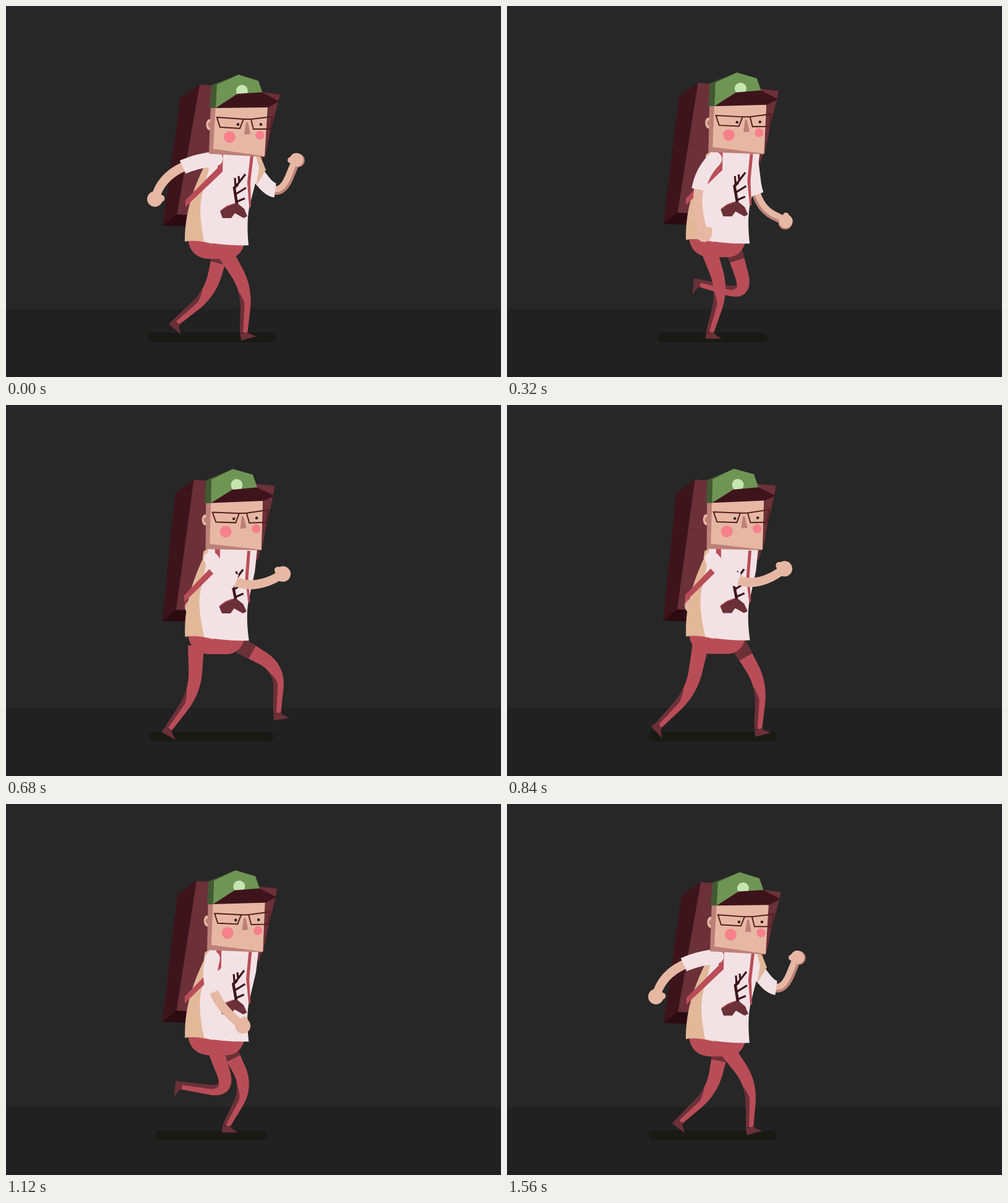
These frames come from a looping animation (800x600 px, 1.6 s). An HTML page with a canvas:

```html
<!DOCTYPE html>
<html lang="en">
<head>
<meta charset="utf-8">
<title>Walking hiker</title>
<style>
  html, body { margin: 0; height: 100%; overflow: hidden; background: #272727; }
  canvas { display: block; }
</style>
</head>
<body>
<canvas id="stage" width="800" height="600"></canvas>
<script>
const ctx = document.getElementById('stage').getContext('2d');
const LOOP = 1600, STEP = 40, SAMPLES = 40, RAD = Math.PI / 180;
const RED = '#b94d57', BROWN = '#6b3038', DARK = '#3e141c', WHITE = '#f3e2e5',
      SKIN = '#e6b8a3', SHADE = '#bc8078', TAN = '#e2b899';

// Heel x, heel y and foot angle at eight even moments of one stride
const stride = [
  [380, 541, -13], [344, 538, 1], [305, 538, 4], [266, 533, 24],
  [235, 521, 44], [240, 508, 72], [306, 420, 101], [405, 494, 9]
];
const nearLeg = { delay: 0, hip: 331, swing: 24, dx: 0, dy: 0 };
const farLeg = { delay: LOOP / 2, hip: 362, swing: 17, dx: 28, dy: -7 };

const wave = (time, period = LOOP) => Math.cos(2 * Math.PI * time / period);

// Quick rise, slower fall, four times per loop
const bobAt = time => 8 * (wave((time % 400 / 400) ** 0.66, 1) - 1);

// Closed Catmull-Rom curve through evenly timed points
function follow(points, time) {
  const n = points.length, pos = (time / LOOP * n + n) % n, i = Math.floor(pos), u = pos - i;
  const [a, b, c, d] = [-1, 0, 1, 2].map(k => points[(i + k + n) % n]);
  return b.map((p, j) => p + u / 2 * (c[j] - a[j]
    + u * (2 * a[j] - 5 * p + 4 * c[j] - d[j] + u * (3 * (p - c[j]) + d[j] - a[j]))));
}

function poly(color, ...p) {
  ctx.fillStyle = color;
  ctx.beginPath();
  for (let i = 0; i < p.length; i += 2) ctx.lineTo(p[i], p[i + 1]);
  ctx.fill();
}
function shape(color, d) { ctx.fillStyle = color; ctx.fill(new Path2D(d)); }
function line(color, width, d) {
  ctx.strokeStyle = color;
  ctx.lineWidth = width;
  ctx.stroke(new Path2D(d));
}
function dot(color, x, y, rx, ry = rx) {
  ctx.fillStyle = color;
  ctx.beginPath();
  ctx.ellipse(x, y, rx, ry, 0, 0, 7);
  ctx.fill();
}

// Two straight bones whose shared corner is rounded; each sample has a normal
function limb([ax, ay], [kx, ky], [bx, by], round) {
  const soft = v => v > round ? v : v < -round ? 0 : (v + round) ** 2 / (4 * round);
  const at = t => {
    const p = soft(1 - 2 * t), q = soft(2 * t - 1);
    return [kx + (ax - kx) * p + (bx - kx) * q, ky + (ay - ky) * p + (by - ky) * q];
  };
  return Array.from({ length: SAMPLES + 1 }, (_, i) => {
    const t = i / SAMPLES, [x, y] = at(t);
    const [x0, y0] = at(t - 0.01), [x1, y1] = at(t + 0.01);
    const len = Math.hypot(x1 - x0, y1 - y0) || 1;
    return { t, x, y, nx: (y0 - y1) / len, ny: (x1 - x0) / len };
  });
}
function upTo(points, distance) {
  const [o] = points;
  return points.filter(p => p.t <= 0.6 && Math.hypot(p.x - o.x, p.y - o.y) <= distance);
}
function ribbon(color, points, outer, inner = t => -outer(t)) {
  const edge = w => points.map(p => [p.x + p.nx * w(p.t), p.y + p.ny * w(p.t)]);
  poly(color, ...[...edge(outer), ...edge(inner).reverse()].flat());
}

// The knee is solved from hip and ankle
function leg({ delay, hip, swing, dx, dy }, time, bob) {
  const phase = time - delay, [x, y, angle] = follow(stride, phase);
  const heelX = x + dx, heelY = y + dy, cos = Math.cos(angle * RAD), sin = Math.sin(angle * RAD);
  const hipX = hip + swing * wave(phase + 140), hipY = 395 + bob;
  const ankleX = heelX + 7 * cos + 11 * sin, ankleY = heelY + 7 * sin - 11 * cos;
  const vx = ankleX - hipX, vy = ankleY - hipY, span = Math.hypot(vx, vy);
  const bend = 1.2 * Math.max(18, Math.sqrt(Math.max(0, 70 ** 2 - span * span / 4))) / span;
  const knee = [hipX + vx / 2 + vy * bend, hipY + vy / 2 - vx * bend];

  const bone = limb([hipX, hipY], knee, [ankleX, ankleY], 0.45);
  const width = t => 13 - 7 * t;
  ribbon(RED, bone, width);
  if (delay) ribbon(BROWN, upTo(bone, 23), width);
  ribbon(BROWN, bone.slice(SAMPLES / 2), width, t => width(t) * (1 - 0.8 * Math.min(1, (t - 0.5) * 6)));
  ctx.save();
  ctx.translate(heelX, heelY);
  ctx.rotate(angle * RAD);
  poly(BROWN, 0, 0, 1, -12, 6, -10, 13, -12, 15, -8, 26, -1);
  ctx.restore();
}

// Arm angles are degrees from straight down, positive to the front
function arm(x, y, upper, upperLength, fore, foreLength, round) {
  const step = ([px, py], angle, length) =>
    [px + length * Math.sin(angle * RAD), py + length * Math.cos(angle * RAD)];
  const elbow = step([x, y], upper, upperLength);
  return limb([x, y], elbow, step(elbow, fore, foreLength), round);
}
function hand(color, { x, y, nx, ny }, r, shift = 0) {
  dot(color, x + nx * shift, y + ny * shift, r);
  dot(color, x - nx * r * 0.75 - ny * 4, y - ny * r * 0.75 + nx * 4, r * 0.45);
}

// c runs from 1 (arms fully apart) to -1 (arms crossed)
function farArm(c) {
  const front = Math.max(0, c), back = Math.min(0, c), x = 394 + 3 * c, y = 256 + 4 * c;
  const fore = Math.max(-60, 64 + 95 * front ** 5 + 320 * back);
  const bone = arm(x, y, 40 * c - 2, 72, fore, 52 + 22 * front ** 4, 0.6);
  ribbon(SKIN, bone, () => 7);
  ribbon(SHADE, bone.slice(12), () => 7, () => 3);
  hand(SHADE, bone[SAMPLES], 11, 2.5);
  hand(SKIN, bone[SAMPLES], 11);
  ribbon(WHITE, upTo(bone, 54), t => 12 - t);
}
function nearArm(c) {
  const middle = 1 - c * c, front = Math.max(0, c);
  const bone = arm(335 + 4 * c, 251 - 4 * c,
    -20 - 62 * c - 8 * middle, 60 + 22 * c * c,
    55 - 73 * c - 22 * middle, 80 - 24 * front ** 4, 0.9);
  ribbon(SKIN, bone, t => 8 - t);
  hand(SKIN, bone[SAMPLES], 12.5);
  dot(WHITE, bone[0].x, bone[0].y, 11.5);
  ribbon(WHITE, upTo(bone, 56), t => 12 - t);
}

function backpack() {
  poly(BROWN, 313, 127, 340, 129, 340, 250, 300, 340, 276, 338);
  poly(DARK, 282, 149, 313, 127, 276, 338, 253, 355);
  poly('#2c0b13', 253, 355, 276, 337, 300, 338, 300, 357);
  poly(BROWN, 398, 238, 416, 243, 411, 258);
}

function shirt() {
  shape(TAN, 'M289 381C289 340 299 302 322 256L324 243 334 236V385Q306 377 289 381Z');
  shape(WHITE, 'M332 234L411 240 406 275 394 322Q388 348 392 387Q352 388 320 381Q312 340 315 316C318 295 331 262 332 234Z');
  poly(BROWN, 346, 332, 357, 324, 373, 318, 385, 328, 390, 340, 384, 343, 370, 335, 364, 343, 350, 343);
  line(RED, 1.5, 'M347 331L357 324 368 320');
  line(DARK, 4.5, 'M373 320L369 294 375 288');
  line(DARK, 3.2, 'M373 290L387 272M371 292L370 278M377 285L376 275M370 305L388 294M372 317L386 311');
  poly(RED, 343, 238, 351, 238, 350, 268, 290, 325, 290, 314, 342, 262);
  poly(RED, 395, 242, 400, 242, 395, 285, 396, 325, 393, 325, 390, 285);
}

function head(bob, sway) {
  const drop = -0.42 * bob, lift = 3 * sway;
  poly(BROWN, 410, 139 - lift, 443, 143 - lift, 439, 160, 428, 200, 419, 243, 414, 242);
  dot(SKIN, 329, 192, 5.5, 9);
  dot(SHADE, 329, 192, 2.5, 4);
  poly(SHADE, 331, 160, 328, 239, 418, 244, 423, 160);
  poly(SKIN, 339, 160, 335, 231, 418, 243, 423, 160);

  poly('#435932', 332, 128, 376, 111, 345, 160, 339, 165, 329, 165);
  poly('#6f9555', 341, 127, 376, 111, 408, 121, 415, 141 + drop, 374, 147 + drop, 339, 165);
  dot('#c6e5b0', 381.5, 137, 9.5);
  poly(DARK, 339, 165, 374, 142 + drop, 414, 139.5 + drop, 442, 154 + drop, 424, 164);

  poly(SHADE, 388, 188, 391, 188, 395, 207, 385, 208);
  dot('#f7808c', 361.5, 212, 9.5);
  dot('#f7808c', 410.5, 209, 7.2);
  dot('#2a2020', 375, 191.5, 2.3);
  dot('#2a2020', 412, 191.5, 2.3);
  line('#54201f', 2, 'M341 180L384 183 378 198 346 196ZM384 183H396L431 179 427 199H400L396 183');
}

function draw(time) {
  const bob = bobAt(time), apart = wave(time + 20);
  const sway = (1 - wave(time + 60)) / 2, lean = 0.04 * sway;
  const shadow = 96 + 8 * wave(time, LOOP / 2);
  const body = (paint, shear = 0) => {
    ctx.save();
    ctx.transform(1, 0, shear, 1, -370 * shear, bob);
    paint(apart);
    ctx.restore();
  };

  ctx.fillStyle = '#272727';
  ctx.fillRect(0, 0, 800, 600);
  ctx.fillStyle = '#212121';
  ctx.fillRect(0, 490, 800, 110);
  ctx.fillStyle = '#191a16';
  ctx.beginPath();
  ctx.roundRect(332 - shadow, 528, shadow * 2, 16, 8);
  ctx.fill();

  body(backpack, lean);
  body(farArm);
  leg(farLeg, time, bob);
  leg(nearLeg, time, bob);
  body(() => shape(RED, 'M294 376C296 400 312 409 330 409H358Q380 407 386 382Z'));
  body(shirt, lean);
  if (apart > 0.4) body(() => poly(TAN, 404, 242, 412, 245, 420, 265, 404, 291, 409, 262));
  body(nearArm);

  ctx.save();
  ctx.translate(372 - 5.5 * sway, 240 + bob - 1.5 * sway);
  ctx.rotate(-1.8 * sway * RAD);
  ctx.translate(-372, -240);
  head(bob, sway);
  ctx.restore();
}

const start = performance.now();
function tick() {
  const elapsed = performance.now() - start;
  draw(Math.floor(elapsed / STEP) * STEP % LOOP);
  requestAnimationFrame(tick);
}
tick();
</script>
</body>
</html>
```
